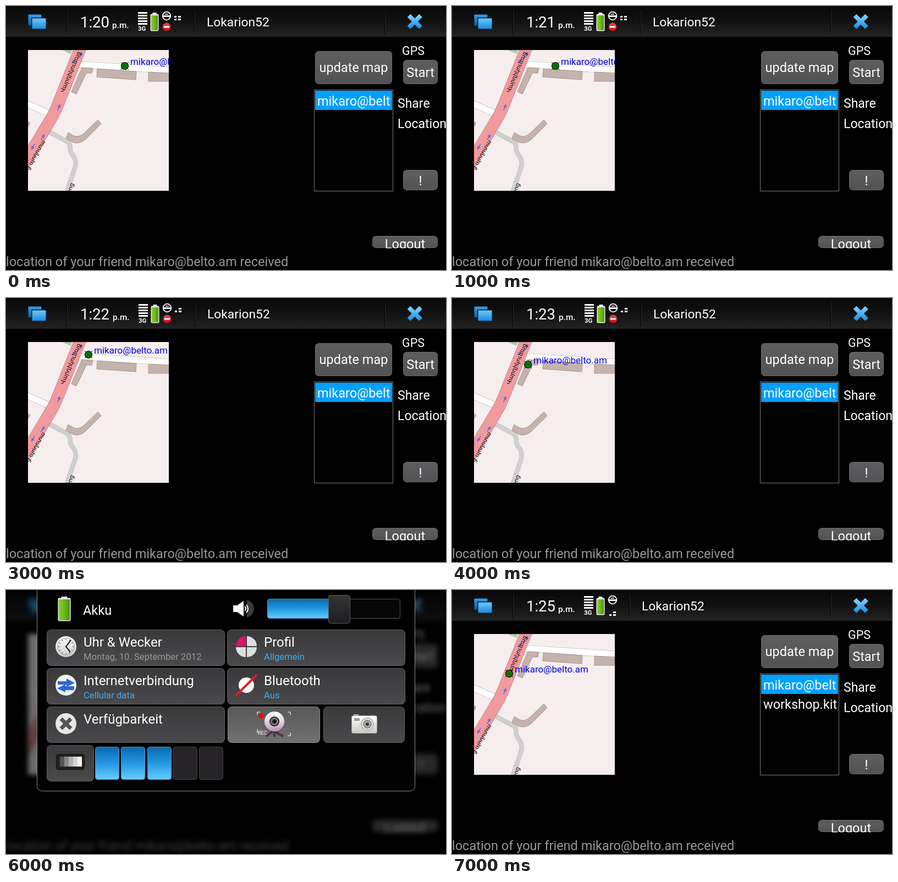
Write an HTML page with a canvas that moves like this. It is 800x480 px and loops after 8000 ms.

```html
<!DOCTYPE html>
<html lang="en">
<head>
<meta charset="utf-8">
<title>Map friend finder</title>
<style>
html, body { margin: 0; width: 100%; height: 100%; overflow: hidden; background: #000; }
canvas { display: block; width: 800px; height: 480px; }
</style>
</head>
<body>
<canvas id="stage" width="800" height="480"></canvas>
<script>
const stage = document.getElementById('stage').getContext('2d');
const backdrop = document.createElement('canvas');
backdrop.width = 800;
backdrop.height = 480;
const backdropCtx = backdrop.getContext('2d');
let c = stage;

const FRIEND = 'mikaro@belto.am';
const BASE = { shift: 0, net: '3G', dots: 3, compact: false, contacts: 1 };
const LATE = { ...BASE, compact: true, contacts: 2 };
const STATES = [
  { ...BASE, time: '1:20', dots: 4, marker: [216, 109] },
  { ...BASE, time: '1:21', dots: 4, marker: [188, 109] },
  { ...BASE, time: '1:21', net: '3.5', marker: [160, 109], banner: true },
  { ...BASE, time: '1:22', shift: 1, marker: [150, 103] },
  { ...BASE, time: '1:23', shift: 1, marker: [138, 121] },
  { ...LATE, time: '1:24', marker: [127, 140] },
  { ...LATE, time: '1:24', marker: [127, 140], menu: true },
  { ...LATE, time: '1:25', marker: [104, 152] }
];

function text(str, x, y, size = 23.5, color = '#fff', align = 'left', weight = 400) {
  c.font = `${weight} ${size}px Roboto, "Open Sans", sans-serif`;
  c.textAlign = align;
  c.fillStyle = color;
  c.fillText(str, x, y);
}

function gradient(x0, y0, x1, y1, colors) {
  const g = c.createLinearGradient(x0, y0, x1, y1);
  colors.forEach((color, i) => g.addColorStop(i / (colors.length - 1), color));
  return g;
}
const fade = (y0, y1, ...colors) => gradient(0, y0, 0, y1, colors);
const sweep = (x0, x1, ...colors) => gradient(x0, 0, x1, 0, colors);

function rect(x, y, w, h, fill) {
  c.fillStyle = fill;
  c.fillRect(x, y, w, h);
}

function box(x, y, w, h, r, fill, border) {
  c.beginPath();
  c.roundRect(x + 0.5, y + 0.5, w - 1, h - 1, r);
  c.fillStyle = fill;
  c.fill();
  if (border) {
    c.strokeStyle = border;
    c.lineWidth = 1;
    c.stroke();
  }
}

function disc(x, y, r, fill, border, width = 1) {
  c.beginPath();
  c.arc(x, y, r, 0, Math.PI * 2);
  if (fill) {
    c.fillStyle = fill;
    c.fill();
  }
  if (border) {
    c.strokeStyle = border;
    c.lineWidth = width;
    c.stroke();
  }
}

function trace(d, color, width) {
  c.strokeStyle = color;
  c.lineWidth = width;
  c.stroke(new Path2D(d));
}

function shape(d, fill, border) {
  const path = new Path2D(d);
  c.fillStyle = fill;
  c.fill(path);
  if (border) {
    c.strokeStyle = border;
    c.lineWidth = 1;
    c.stroke(path);
  }
}

function battery(x, y, w, h) {
  rect(x + w * 0.28, y, w * 0.44, 4, '#eee');
  box(x, y + 2, w, h - 2, 2, '#eee');
  rect(x + 2, y + 5, w - 4, h - 7, sweep(x, x + w, '#8fd62c', '#6cb81a', '#3f8c0c'));
}

function divider(x) {
  rect(x, 8, 1, 44, '#000');
  rect(x + 1, 8, 1, 44, '#2c2c2c');
}

function statusBar(s) {
  rect(0, 0, 800, 56, fade(0, 56, '#080808', '#121212', '#232323'));
  const dx = s.shift;
  const titleX = (s.compact ? 345 : 365) + dx;
  [110, titleX - 23, 688].forEach(divider);

  box(40, 15, 25, 21, 1, fade(15, 36, '#2fa0ee', '#0f5a98'));
  rect(46, 21, 28, 22, '#0a1c2a');
  box(47, 22, 26, 20, 1, fade(22, 42, '#6accff', '#1c88dc'));
  trace('M732.5 17.5L754 39M754 17.5L732.5 39', fade(16, 40, '#7ed4ff', '#2090e4'), 8);

  text(s.time, 135, 39, 27.5);
  text('p.m.', 193 + dx, 40, 15.3, '#fff', 'left', 500);

  c.save();
  c.translate(dx, 0);
  for (let i = 0; i < 5; i++) rect(240, 11 + i * 5, 17, 3, '#fff');
  text(s.net, 240, 45, 11.5, '#fff', 'left', 700);
  battery(262, 12, 16, 34);
  disc(292, 18, 7.3, null, '#fff', 1.8);
  rect(285, 17, 15, 3, '#fff');
  rect(289, 14, 6, 1.5, '#fff');
  if (s.compact) {
    c.translate(-20, 21);
  } else {
    disc(292, 38, 7.5, fade(30, 46, '#f04448', '#c80c14'));
    rect(287, 36.5, 10, 3, '#fff');
  }
  [[306, 23], [313, 18], [313, 23], [306, 18]].slice(0, s.dots)
    .forEach(([x, y]) => rect(x, y, x < 310 ? 4 : 5, 3, '#fff'));
  c.restore();
  text('Lokarion52', titleX, 37, 22.8);
}

function mapLabel(str, x, y, angle) {
  c.save();
  c.translate(x, y);
  c.rotate(angle * Math.PI / 180);
  c.font = '10.5px "DejaVu Sans", sans-serif';
  c.textAlign = 'left';
  c.fillStyle = '#000';
  c.fillText(str, 0, 0);
  c.restore();
}

function roadArrow(x, y, angle) {
  c.save();
  c.translate(x, y);
  c.rotate(angle * Math.PI / 180);
  trace('M-6 0H1', '#6265d8', 1.5);
  shape('M0 -3L6 0L0 3Z', '#6265d8');
  c.restore();
}

function drawMap([mx, my]) {
  c.save();
  c.beginPath();
  c.rect(40, 80, 256, 256);
  c.clip();
  rect(40, 80, 256, 256, '#f6eeee');
  shape('M102 80H120L117 87Z', '#acc8a6');

  const lane = 'M80 230L112 247Q117 250 117 262Q118 268 124 275Q128 282 126 292L109 342';
  trace(lane, '#c4c0c0', 8.5);
  trace(lane, '#cfcfcf', 7);
  const side = 'M30 174L84 198M128 106L300 117';
  trace(side, '#c3bdbd', 12.5);
  trace(side, '#fff', 11);
  const avenue = 'M137 72L92 185Q87 197 80 208L27 297';
  trace(avenue, '#b98488', 22);
  trace(avenue, '#f09a9e', 20.5);

  const wall = '#a8938e';
  [
    'M166 114L237 119L236 134L165 129Z',
    'M259 120L298 122V137H259Z',
    'M138 112L158 113L156 122H146L128 160L119 156Z',
    'M113 230L123 236Q132 239 140 233L167 207L173 214L145 242Q134 252 122 248L109 241Z',
    'M38 209L44 213L38 223Z'
  ].forEach(d => shape(d, '#c6b2ad', wall));

  roadArrow(96, 184, -67);
  roadArrow(67, 238, -58);
  roadArrow(49, 256, 121);
  roadArrow(136, 89, -67);
  roadArrow(124, 99, 113);
  mapLabel('Վարդիկունաց պողոտա', 105, 158, -67);
  mapLabel('ց պողոտա', 42, 299, -61);
  mapLabel('ղոց', 117, 342, -70);

  trace(`M${mx - 7} ${my - 7}l14 14m0 -14l-14 14`, '#000', 1);
  disc(mx, my, 6.5, '#087c0c', '#000', 1.2);
  trace(`M${mx - 4} ${my - 4}l8 8m0 -8l-8 8`, '#055008', 1);
  text(FRIEND, mx + 10, my - 2, 17, '#0000e0');
  c.restore();
}

function button(label, x, y, w, h, baseline) {
  box(x, y, w, h, 6, fade(y, y + h, '#5e5d5f', '#525153'), '#6d6c6e');
  text(label, x + w / 2, baseline, 23.5, '#fff', 'center');
}

function banner() {
  rect(0, 56, 800, 47, sweep(0, 800, 'rgba(232,146,8,.92)', 'rgba(232,206,122,.92)', 'rgba(232,146,8,.92)'));
  rect(0, 56, 800, 47, fade(56, 103, 'rgba(255,255,255,.06)', 'rgba(0,0,0,.06)'));
  text('You have 20s to press the camera capture key to take screenshot.', 399, 88, 23.4, '#000', 'center');
}

function app(s) {
  rect(0, 0, 800, 480, '#000');
  statusBar(s);
  drawMap(s.marker);

  button('update map', 562, 82, 140, 60, 120);
  button('Start', 722, 98, 63, 44, 129);
  button('!', 722, 298, 63, 37, 326);
  text('GPS', 720, 89, 21.5);
  text('Share', 712, 185, 23);
  text('Location', 712, 222, 23);
  c.save();
  c.beginPath();
  c.rect(660, 410, 130, 30.5);
  c.clip();
  button('Logout', 666, 418, 119, 22, 441);
  c.restore();

  c.strokeStyle = '#7a7a7a';
  c.lineWidth = 1;
  c.strokeRect(560.5, 152.5, 143, 184);
  rect(562, 154, 140, 35, '#00a0ff');
  text(FRIEND.slice(0, 11), 566, 181);
  if (s.contacts > 1) text('workshop.kit', 566, 216);
  text(`location of your friend ${FRIEND} received`, 0, 473, 23.5, '#999');

  if (s.banner) banner();
}

function tile(x, y, w, title, sub, subColor = '#35b0ff') {
  box(x, y, w, 66, 7, fade(y, y + 66, '#39383a', '#4a494b'), '#626163');
  const textX = x + 67;
  if (title) text(title, textX, y + 31, 24);
  if (sub) text(sub, textX, y + 55, 16.7, subColor);
}

function blueBar(x, y, w, h) {
  box(x, y, w, h, 4, fade(y, y + h, '#0b67ac', '#2496e2', '#68ceff'), '#3a9ee0');
}

function volumeRow() {
  battery(94, 12, 24, 45);
  text('Akku', 140, 45);
  c.beginPath();
  c.arc(435, 34, 16, -1.4, 1.4);
  c.fillStyle = '#3a3a3a';
  c.fill();
  shape('M413 28H420L432 20V48L420 40H413Z', '#fff');
  trace('M434 30Q438 34 434 38M437 27Q443 34 437 41', '#fff', 2);
  box(475, 16, 242, 36, 4, '#060606', '#555');
  blueBar(475, 16, 114, 36);
  box(586, 9, 40, 52, 4, fade(9, 61, '#343336', '#1e1d20'), '#5a595c');
}

function menuIcons() {
  disc(109, 103, 19, fade(84, 122, '#fff', '#d0d0d0'));
  disc(109, 103, 15.5, null, '#999', 1);
  for (let i = 0; i < 12; i++) {
    const a = i * Math.PI / 6;
    disc(109 + 13 * Math.cos(a), 103 + 13 * Math.sin(a), 0.9, '#444');
  }
  trace('M118 91L109 103L117 113', '#222', 2.2);

  disc(109, 173, 19, '#f0f0f2');
  shape('M94 166H110V161L125 169L110 176V172H94Z', '#2c68d8');
  shape('M124 175H108V171L93 179L108 186V182H124Z', '#2c68d8');

  disc(109, 243, 19, '#e6e6e6');
  trace('M100 234L118 252M118 234L100 252', '#555', 7);

  for (let i = 0; i < 4; i++) {
    const a = i * Math.PI / 2;
    const x = 437 + (i === 1 || i === 2 ? -1 : 1);
    const y = 103 + (i < 2 ? 1 : -1);
    c.beginPath();
    c.moveTo(x, y);
    c.arc(x, y, 18, a, a + Math.PI / 2);
    c.fillStyle = i === 2 ? '#d8146c' : '#dedede';
    c.fill();
  }

  disc(437, 173, 14, '#fff');
  trace('M418 192L456 154', '#e81c20', 4);
}

function captureIcons() {
  trace('M473 266L486 256L504 266M488 256V267', '#4a3444', 4);
  disc(488, 239, 18, fade(221, 257, '#fff', '#e6d4e6', '#b892b4'));
  disc(488, 239, 9, '#222');
  disc(488, 239, 6, '#3c4a44', '#9aa89a', 1.5);
  disc(488, 239, 2.5, '#000');
  trace('M457 227V222H462M512 222H517V227M517 260V265H512M457 253V260', '#fff', 1.2);
  disc(464, 229, 4.5, '#f00');
  text('REC', 458, 263, 9);

  rect(632, 226, 9, 4, '#bbb');
  box(628, 228, 47, 33, 3, fade(228, 261, '#fff', '#c8c8c4'), '#999');
  rect(633, 233, 10, 5, '#999');
  disc(657, 244, 11, '#e4e4e0', '#aaa', 1.5);
  disc(657, 244, 7, '#a4acac', '#777', 1.5);
  disc(657, 244, 3, '#303840');
}

function brightnessRow() {
  tile(74, 282, 86);
  box(91, 298, 52, 29, 4, '#202020', '#111');
  ['#555', '#888', '#b0b0b0', '#d4d4d4', '#f2f2f2'].forEach((shade, i) => rect(98 + i * 8, 303, 8, 18, shade));
  for (let i = 0; i < 5; i++) {
    const x = 162 + Math.round(i * 47.3);
    if (i < 3) blueBar(x, 285, 44, 60);
    else box(x, 285, 44, 60, 4, '#262427', '#444245');
  }
}

function menu() {
  box(56, -20, 688, 386, 9, '#000', '#8a8a8a');
  volumeRow();
  tile(74, 72, 324, 'Uhr & Wecker', 'Montag, 10. September 2012', '#999');
  tile(402, 72, 324, 'Profil', 'Allgemein');
  tile(74, 142, 324, 'Internetverbindung', 'Cellular data');
  tile(402, 142, 324, 'Bluetooth', 'Aus');
  tile(74, 212, 324, 'Verfügbarkeit');
  box(403, 212, 168, 66, 7, fade(212, 278, '#595859', '#727173'), '#8b8a8c');
  tile(577, 212, 148);
  menuIcons();
  captureIcons();
  brightnessRow();
}

function draw(s) {
  c = stage;
  if (!s.menu) {
    app(s);
    return;
  }
  c = backdropCtx;
  app(s);
  c = stage;
  rect(0, 0, 800, 480, '#000');
  c.filter = 'blur(5px) brightness(0.45)';
  c.drawImage(backdrop, 0, 0);
  c.filter = 'none';
  menu();
}

const start = performance.now();
function tick() {
  const t = (performance.now() - start) % 8000;
  draw(STATES[Math.floor(t / 1000)]);
  requestAnimationFrame(tick);
}
tick();
</script>
</body>
</html>
```
